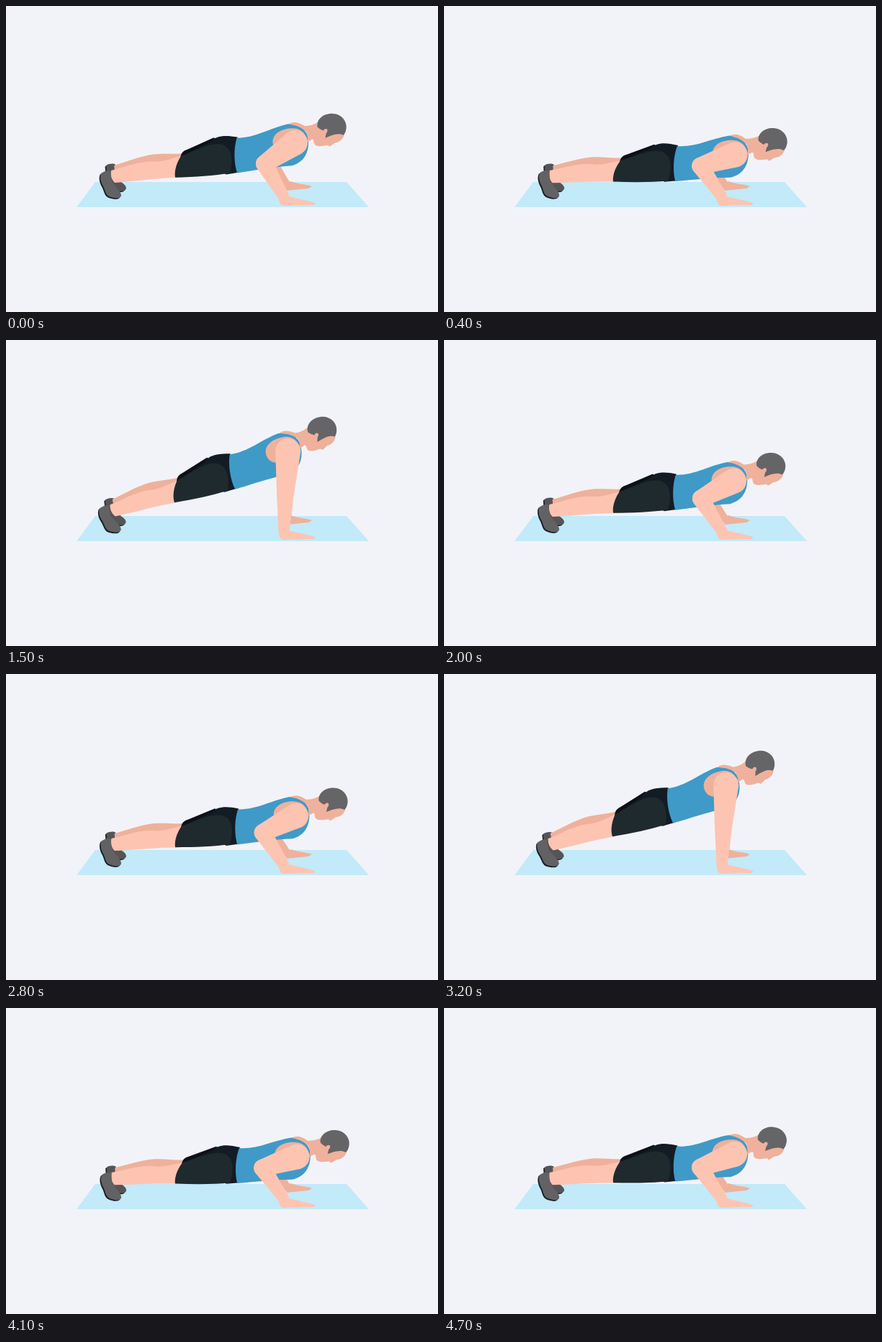
Animation, 600 px wide and 426 px high, one loop 4.8 s. Source, as an HTML page with a canvas:

```html
<!DOCTYPE html>
<html lang="en">
<head>
<meta charset="utf-8">
<title>Push-up</title>
<style>
html, body { margin: 0; width: 100%; height: 100%; overflow: hidden; background: #f2f3f8; }
canvas { display: block; }
</style>
</head>
<body>
<canvas id="stage" width="600" height="426"></canvas>
<script>
const ctx = document.getElementById('stage').getContext('2d');

const LOOP = 4800, STEP = 100, REP = 1950, LOWEST = 455;
const RISE_START = 315, RISE_END = 750;   // ms away from the lowest point
const TOP = 107, BOTTOM = 170, REST = 147; // height of the head
const ANKLE = { x: 148, y: 240 }, TOE = { x: 157, y: 268 }, REACH = 318;
const SHOULDER = { x: 401, y: 188 };

const BACK = '#f2f3f8', MAT = '#c2eaf8', SKIN = '#fec4b2', SHADE = '#efb19c';
const SHIRT = '#3f9ac8', SHORTS = '#1f2a2f', NAVY = '#131c25', BLACK = '#0d1116';
const HAIR = '#656567', SHOE = '#626264', FAR_SHOE = '#555558', SOLE = '#1c1e2a';

const shape = (fill, d, dx = 0, dy = 0) => ({ fill, path: new Path2D(d), dx, dy });
const shoe = (fill, d) => [shape(SOLE, d, -1.5, 1.5), shape(fill, d)];

const mat = shape(MAT, 'M98 280 L124 245 H473 L504 280 Z');
const farShoe = shoe(FAR_SHOE, 'M139 222 C143 219 150 219 152 221 L153 236 C157 246 167 247 167 254 C165 259 158 258 154 257 L140 235 Z');
const nearShoe = shoe(SHOE, 'M132 233 C136 230 142 228 145 230 C146 236 145 242 149 247 C153 253 160 258 160 264 C159 269 150 268 143 265 C138 262 138 257 135 251 C131 244 130 238 132 233 Z');

const body = [
  // legs
  shape(SHADE, 'M150 222 C166 217 185 209 204 206 C220 204 232 206 246 204 L244 228 L152 240 Z'),
  shape(SKIN, 'M146 229 C164 225 181 216 204 216 C219 217 230 211 244 208 L240 238 C208 239 179 244 151 246 C146 241 145 235 146 229 Z'),
  // shorts
  shape(BLACK, 'M242 212 C242 205 245 201 251 199 L288 182 L300 190 Z'),
  shape(NAVY, 'M245 208 L284 188 C290 179 304 178 321 181 L324 230 L306 233 Z'),
  shape(SHORTS, 'M235 238 C233 228 238 215 243 208 C262 201 289 185 303 193 C316 200 314 218 311 231 C290 235 262 237 235 238 Z'),
  // shirt, neck and head
  shape(SHADE, 'M391 163 C397 158 405 159 413 164 L418 172 L398 169 Z'),
  shape(SHIRT, 'M320 182 C346 182 365 168 391 162 C404 164 417 168 419 181 C422 200 414 215 397 220 C372 222 346 227 321 231 C316 216 316 196 320 182 Z'),
  shape(SHADE, 'M408 164 C419 166 427 163 434 158 L465 165 L469 177 C467 184 462 187 456 188 L449 193 L446 191 C440 192 434 194 429 191 C426 188 428 184 425 183 L418 187 C420 177 416 169 408 164 Z'),
  shape(HAIR, 'M432 166 C430 156 439 147 452 147 C465 147 472 157 472 165 C472 171 470 175 468 177 C462 174 456 176 450 178 L443 181 L444 175 C449 169 443 166 440 171 C438 170 435 169 432 166 Z'),
  // armhole
  shape(SHADE, 'M370 188 C369 176 382 168 398 168 C409 168 416 175 416 184 L392 202 C381 204 371 199 370 188 Z')
];
const nearHand = shape(SKIN, 'M379 264 L393 265 C405 269 420 270 430 275 L427 277 L384 278 C380 276 378 270 379 264 Z');
const farHand = shape(SHADE, 'M387 248 L395 244 C405 248 418 248 425 251 L420 254 L390 257 Z');

const clamp = v => Math.min(1, Math.max(0, v));
const lean = y => Math.asin((y - ANKLE.y) / REACH);

function headTop(t) {
  const gap = Math.abs(t % REP - LOWEST);
  const away = Math.min(gap, REP - gap);
  return BOTTOM - (BOTTOM - TOP) * clamp((away - RISE_START) / (RISE_END - RISE_START));
}

function turn(p, pivot, angle) {
  const x = p.x - pivot.x, y = p.y - pivot.y, c = Math.cos(angle), s = Math.sin(angle);
  return { x: pivot.x + x * c - y * s, y: pivot.y + x * s + y * c };
}

function paint(shapes, pivot = ANKLE, angle = 0) {
  for (const s of shapes) {
    ctx.save();
    ctx.translate(pivot.x, pivot.y);
    ctx.rotate(angle);
    ctx.translate(s.dx - pivot.x, s.dy - pivot.y);
    ctx.fillStyle = s.fill;
    ctx.fill(s.path);
    ctx.restore();
  }
}

// Tapered limb with round ends
function limb(a, ra, b, rb, fill) {
  const dir = Math.atan2(b.y - a.y, b.x - a.x);
  const open = Math.acos((ra - rb) / Math.hypot(b.x - a.x, b.y - a.y));
  ctx.beginPath();
  ctx.arc(a.x, a.y, ra, dir + open, dir - open);
  ctx.arc(b.x, b.y, rb, dir - open, dir + open);
  ctx.fillStyle = fill;
  ctx.fill();
}

function draw(t) {
  const y = headTop(t), angle = lean(y) - lean(REST);
  const bend = (y - TOP) / (166 - TOP);
  const shoulder = turn(SHOULDER, ANKLE, angle);
  const elbow = { x: 388 - 32 * Math.sin(bend * Math.PI / 2), y: 213 + 9 * bend };
  const farElbow = { x: elbow.x + 4 + 16 * bend, y: elbow.y + 2 + 6 * bend };

  ctx.fillStyle = BACK;
  ctx.fillRect(0, 0, 600, 426);
  paint([mat]);
  paint(farShoe, TOE, angle * 0.2);
  limb(farElbow, 7, { x: 391, y: 250 }, 5, SHADE);
  paint([farHand]);
  paint(body, ANKLE, angle);
  paint(nearShoe, TOE, angle * 0.45);
  limb(shoulder, 17.5, elbow, 12, SKIN);
  limb(elbow, 12, { x: 386, y: 266 }, 7.5, SKIN);
  paint([nearHand]);
}

function tick() {
  const t = performance.now() % LOOP;
  draw(Math.floor(t / STEP) * STEP);
  requestAnimationFrame(tick);
}
tick();
</script>
</body>
</html>
```
